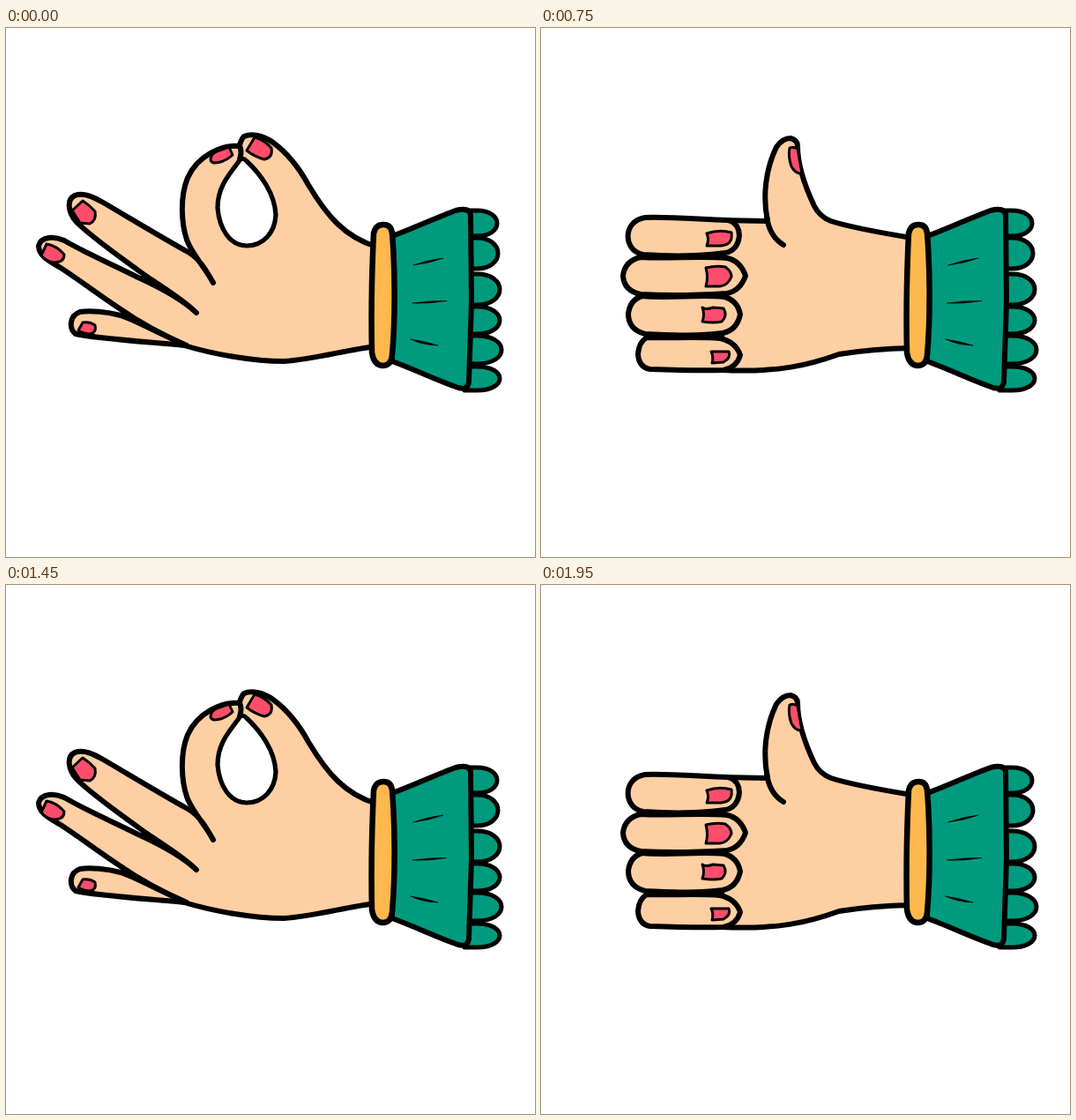
An HTML page for the animation above (2 s loop, 600x600 px).

```html
<!DOCTYPE html>
<html lang="en">
<head>
<meta charset="utf-8">
<title>Hand gestures</title>
<style>
  html, body { margin: 0; width: 100%; height: 100%; overflow: hidden; background: #fff; }
  svg { display: block; width: 100%; height: 100%; }
  path { stroke: #000; stroke-width: 6; stroke-linejoin: round; stroke-linecap: round; }
  .skin { fill: #ffcfa4; }
  .nail { fill: #ff4e6c; stroke-width: 3; }
  .cloth { fill: #009b7e; }
  .scallop { stroke-width: 5; }
  .cuff { fill: #ffb84d; stroke-width: 6.5; }
  .hole { fill: #fff; stroke-width: 5.2; }
  .line { fill: none; }
  .fold { fill: #000; stroke-width: .6; }
</style>
</head>
<body>
<svg viewBox="0 0 600 600">
  <g id="pinch"></g>
  <g id="thumb"></g>
  <g id="sleeve"></g>
</svg>
<script>
const group = id => document.getElementById(id);

function draw(parent, kind, ...shapes) {
  for (const d of shapes) {
    const path = document.createElementNS("http://www.w3.org/2000/svg", "path");
    path.setAttribute("class", kind);
    path.setAttribute("d", d);
    parent.append(path);
  }
}

function drawPinch(g) {
  const thumbAndIndex = "M420 248C384 237 364 213 343 178C331 156 318 141 303 130C292 122 278 119 270 123" +
    "C266 126 267 130 264 134C245 132 217 145 206 170C197 192 199 222 205 240C211 257 225 270 235 289";
  const middle = "C226 273 219 262 208 255C174 236 136 213 112 199C100 192 88 186 78 190" +
    "C68 195 71 209 79 219C95 236 135 264 160 282C182 297 201 308 216 323";
  const ring = "C200 308 172 293 150 283C120 268 90 255 66 241C55 236 40 236 37 247" +
    "C37 259 50 265 62 272C85 287 107 304 130 319C150 333 175 347 205 360";
  const pinky = "C178 349 148 332 130 326C115 322 95 320 84 322C72 326 71 341 79 347C100 352 160 356 202 360";
  const palm = "C235 370 280 378 315 378C350 376 385 365 420 361Z";
  draw(g, "skin", thumbAndIndex + middle + ring + pinky + palm);
  draw(g, "hole", "M265 150C256 163 240 178 240 204C242 228 254 247 273 247C292 247 305 232 306 212C305 188 289 166 273 151Q268 146 265 150Z");
  draw(g, "line", "M265 133Q268 141 265 149");
  draw(g, "nail",
    "M75 207L87 196Q95 201 101 208Q103 218 95 222L84 221Z",
    "M40 258L46 245Q58 247 66 257Q66 266 54 266Q46 265 40 258Z",
    "M82 343L87 334Q95 333 101 337Q103 345 96 347Q88 347 82 343Z",
    "M232 149Q233 142 239 140L253 135L257 144Q247 153 236 153Q232 152 232 149Z",
    "M273 139L282 124Q293 127 301 136Q303 147 293 149Q282 146 273 139Z");
}

function drawThumb(g) {
  draw(g, "skin",
    "M205 218L257 219C251 190 255 160 267 135Q274 125 283 125Q291 127 291 134C291 156 301 183 310 202" +
    "Q316 214 329 219C350 226 390 233 420 238V363Q375 364 338 370C305 382 270 391 205 388Z",
    "M118 215C145 214 180 217 212 218C231 222 228 252 209 255C180 259 145 259 116 257C93 253 92 219 118 215Z",
    "M113 260C145 262 180 258 211 261Q226 264 232 281Q226 298 211 301C180 303 145 304 113 302Q94 298 93 281Q95 264 113 260Z",
    "M115 304C145 307 180 302 208 305Q223 309 226 325Q222 343 206 346C175 350 145 348 118 347Q99 342 99 324Q101 308 115 304Z",
    "M120 351C145 352 180 350 203 352Q221 356 226 371Q222 385 207 388C180 389 150 388 124 387Q111 385 110 370Q111 356 120 351Z");
  draw(g, "line", "M256 214C258 228 263 239 275 246");
  draw(g, "nail",
    "M188 233Q202 228 216 232Q218 246 204 247L188 247Q191 240 188 233Z",
    "M187 272Q199 269 209 271Q216 276 216 282Q212 292 203 293L187 293Q190 283 187 272Z",
    "M183 317Q187 320 195 317L207 318Q212 326 205 333Q196 335 183 333Q186 325 183 317Z",
    "M193 367H213Q216 374 207 379L194 380Q196 373 193 367Z",
    "M282 136Q286 134 291 137L296 165Q289 166 284 157Q280 146 282 136Z");
}

const scallop = (top, bottom, right) => {
  const reach = 534 + (right - 534) / 0.75;
  return `M520 ${top}H534C${reach} ${top} ${reach} ${bottom} 534 ${bottom}H520Z`;
};

function drawSleeve(g) {
  draw(g, "cloth scallop",
    scallop(207, 236, 557), scallop(238, 273, 558), scallop(279, 314, 560),
    scallop(316, 347, 560), scallop(349, 381, 562), scallop(384, 411, 560));
  draw(g, "cloth", "M438 236C465 226 490 214 510 207Q526 203 527 212L528 310L525 401Q524 411 513 408C490 400 465 388 438 378Z");
  draw(g, "fold",
    "M462 269Q478 263 496 261Q480 267 462 269Z",
    "M461 312Q480 309 500 309.5Q480 313 461 312Z",
    "M459 353Q474 355 490 360Q473 360 459 353Z");
  draw(g, "cuff", "M417 233Q419 223 428 223Q437 223 438 233C441 270 442 325 438 371Q437 383 427 383Q417 382 415 368C414 325 415 275 417 233Z");
}

drawPinch(group("pinch"));
drawThumb(group("thumb"));
drawSleeve(group("sleeve"));

const POSE_MS = 500;
const start = performance.now();

function render() {
  const elapsed = performance.now() - start;
  const pinching = Math.floor(elapsed / POSE_MS) % 2 === 0;
  group("pinch").style.display = pinching ? "" : "none";
  group("thumb").style.display = pinching ? "none" : "";
  requestAnimationFrame(render);
}
render();
</script>
</body>
</html>
```
